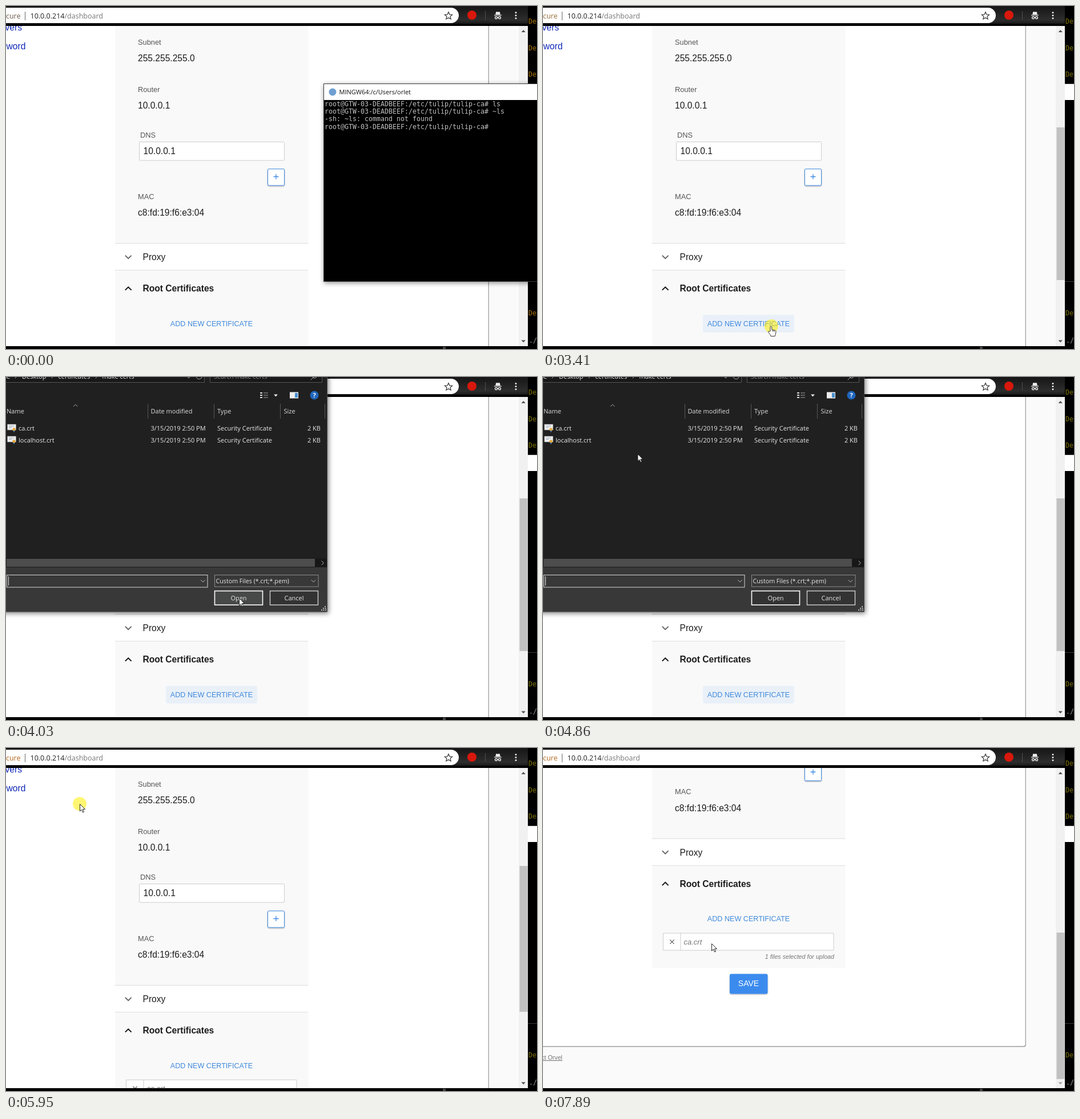
Animation, 930 px wide and 602 px high, one loop 8 s. Source, as an HTML page:

```html
<!DOCTYPE html>
<html lang="en">
<head>
<meta charset="utf-8">
<title>Adding a root certificate</title>
<style>
html, body { margin: 0; width: 100%; height: 100%; overflow: hidden; background: #000; }
svg { display: block; width: 930px; height: 602px; font-family: "Liberation Sans", Arial, sans-serif; }
text { white-space: pre; }
.ui { font-family: "Open Sans", "Noto Sans", sans-serif; }
.mono { font: 11.63px "DejaVu Sans Mono", monospace; }
.label { font-size: 12.8px; fill: #555; }
.value { font-size: 15.6px; fill: #1c1c1c; }
.link { font-size: 15.6px; fill: #1029b8; text-anchor: end; }
.line { fill: none; stroke-linecap: square; }

/* one shared 8 s clock: 1% = 80 ms */
.a { animation: 8s step-end infinite; }
.typed-l { animation-name: typedL; }
.typed-s { animation-name: typedS; }
.prompt { animation-name: prompt; }
.bar { animation-name: bar; }
.front { animation-name: front; }
.secure { animation-name: secure; }
.behind { animation-name: behind; }
.scroll { animation-name: scroll; }
.thumb { animation-name: thumb; }
.down { animation-name: down; }
.halo { animation-name: halo; }
.file { animation-name: file; }
.dialog { animation-name: dialog; transform-origin: 151px 174px; }
.open { animation-name: open; }
.caret { animation-name: caret; }
.row1 { animation-name: row1; }
.row2 { animation-name: row2; }
.pointer { animation-name: pointer; }
.move { animation-name: move; }
.arrow { animation-name: arrow; }
.hand { animation-name: hand; }
.ring { animation-name: ring; }

@keyframes typedL { 0% { opacity: 0 } 1%, 100% { opacity: 1 } }
@keyframes typedS { 0% { opacity: 0 } 2.25%, 100% { opacity: 1 } }
@keyframes prompt { 0% { opacity: 0 } 4.875%, 100% { opacity: 1 } }
@keyframes bar {
  0% { opacity: 0; transform: none }
  1% { opacity: 1; transform: translate(7px, 0) }
  2.25% { opacity: 1; transform: translate(14px, 0) }
  4.875% { opacity: 1; transform: translate(0, 13.4px) }
  11.625% { opacity: 0; transform: translate(0, 13.4px) }
  17.625% { opacity: 1; transform: translate(0, 13.4px) }
  23.25% { opacity: 0; transform: translate(0, 13.4px) }
  29.9375% { opacity: 1; transform: translate(0, 13.4px) }
  37.625%, 100% { opacity: 0; transform: translate(0, 13.4px) }
}
@keyframes front { 0% { opacity: 1 } 42.625%, 100% { opacity: 0 } }
@keyframes secure { 0% { fill: #6e5c4c } 42.625% { fill: #97703a } 74.375%, 100% { fill: #b4691c } }
@keyframes behind { 0% { fill: #a87408 } 42.625%, 100% { fill: #7e7408 } }
@keyframes scroll {
  0% { transform: none }
  87.875% { transform: translateY(-150px) }
  89%, 100% { transform: translateY(-257.5px) }
}
@keyframes thumb {
  0% { y: 213px; height: 268px }
  74.375% { y: 207px; height: 256px }
  87.875% { y: 275px; height: 256px }
  89%, 100% { y: 324px; height: 257px }
}
@keyframes down { 0% { fill: #505050 } 89%, 100% { fill: #a3a3a3 } }
@keyframes halo {
  0% { fill: #e9f0f9; opacity: 0 }
  29.9375% { fill: #e9f0f9; opacity: 1 }
  43.625% { fill: #e0ebf7; opacity: 1 }
  49.375% { fill: #e9f0f8; opacity: 1 }
  74.375%, 100% { fill: #e9f0f8; opacity: 0 }
}
@keyframes file { 0% { opacity: 0 } 74.375%, 100% { opacity: 1 } }
@keyframes dialog {
  0% { opacity: 0; transform: scale(.96) }
  47.625% { opacity: .2; transform: scale(.96) }
  48.625% { opacity: .57; transform: scale(.98) }
  49.375% { opacity: .85; transform: scale(.992) }
  50.375% { opacity: 1; transform: none }
  73.375% { opacity: .45; transform: scale(.975) }
  74.375%, 100% { opacity: 0; transform: scale(.96) }
}
@keyframes open { 0% { fill: #474949 } 53.375%, 100% { fill: #333 } }
@keyframes caret { 0% { opacity: 1 } 54.75% { opacity: 0 } 60.75% { opacity: 1 } 66.625%, 100% { opacity: 0 } }
@keyframes row1 { 0% { opacity: 0 } 61.75%, 100% { opacity: 1 } }
@keyframes row2 { 0% { opacity: 0 } 60.8% { opacity: 1 } 61.75%, 100% { opacity: 0 } }
@keyframes pointer { 0% { opacity: 0 } 23.25%, 100% { opacity: 1 } }
@keyframes move {
  0% { transform: translate(597px, 442px) }
  24.25% { transform: translate(587px, 474px) }
  26.1875% { transform: translate(587px, 474px); animation-timing-function: steps(3) }
  29% { transform: translate(455px, 586px); animation-timing-function: steps(2) }
  30.875% { transform: translate(400px, 562px) }
  44.625% { transform: translate(400px, 562px); animation-timing-function: steps(3) }
  47.625% { transform: translate(408px, 388px) }
  52.44% { transform: translate(408px, 388px); animation-timing-function: steps(5) }
  57.09% { transform: translate(220px, 190px); animation-timing-function: steps(5) }
  61.75% { transform: translate(129px, 98px) }
  79.875% { transform: translate(129px, 98px); animation-timing-function: steps(3) }
  83.25% { transform: translate(493px, 340px) }
  93.78% { transform: translate(493px, 340px); animation-timing-function: steps(3) }
  96.7% { transform: translate(385px, 382px); animation-timing-function: steps(2) }
  98.625%, 100% { transform: translate(295px, 343px) }
}
@keyframes arrow { 0% { opacity: 1 } 29.9375% { opacity: 0 } 45.625%, 100% { opacity: 1 } }
@keyframes hand { 0% { opacity: 0 } 29.9375% { opacity: 1 } 45.625%, 100% { opacity: 0 } }
@keyframes ring { 0% { opacity: 0 } 42.625% { opacity: .55 } 44.625% { opacity: 0 } 70.5% { opacity: .55 } 75.375%, 100% { opacity: 0 } }
</style>
</head>
<body>
<svg viewBox="0 0 930 602">
  <defs>
    <clipPath id="view"><rect y="35" width="914" height="562"/></clipPath>
    <linearGradient id="bar" x2="0" y2="1">
      <stop stop-color="#161616"/><stop offset=".8" stop-color="#2d2d2d"/><stop offset="1" stop-color="#1a1a1a"/>
    </linearGradient>
    <filter id="soft" x="-10%" y="-10%" width="120%" height="120%"><feGaussianBlur stdDeviation="4"/></filter>
    <filter id="lift" x="-20%" y="-20%" width="140%" height="150%"><feDropShadow dx="0" dy="1" stdDeviation="1" flood-opacity=".35"/></filter>
    <g id="cert">
      <path d="M2.500 0h15v10h-15z" fill="#eee" stroke="#999" stroke-width=".6"/>
      <path d="M5 3h9M5 5.500h5" stroke="#9ab" fill="none"/>
      <circle cx="14" cy="9" r="2.700" fill="#e4a93a"/>
      <path d="M13 11v3l1-1 1 1v-3z" fill="#4a7fc0"/>
    </g>
    <g id="term">
      <rect x="557" y="138" width="390" height="348" fill="#000" opacity=".45" filter="url(#soft)"/>
      <rect x="556.500" y="136.500" width="390" height="347" stroke="#3a3a3a"/>
      <rect x="557" y="137" width="390" height="28" fill="#fff"/>
      <circle cx="572" cy="151" r="6.500" fill="#6f9fd2"/>
      <text class="ui" x="583.500" y="155" font-size="11" fill="#111">MINGW64:/c/Users/orlet</text>
      <g class="mono" fill="#c0c0c0">
        <text x="558" y="176">root@GTW-03-DEADBEEF:/etc/tulip/tulip-ca# ls</text>
        <text x="558" y="189">root@GTW-03-DEADBEEF:/etc/tulip/tulip-ca# ~ls</text>
        <text x="558" y="202">-sh: ~ls: command not found</text>
        <text x="558" y="215.500">root@GTW-03-DEADBEEF:/etc/tulip/tulip-ca#</text>
        <text class="a typed-l" x="852" y="215.500">l</text>
        <text class="a typed-s" x="859" y="215.500">s</text>
        <text class="a prompt" x="558" y="229">root@GTW-03-DEADBEEF:/etc/tulip/tulip-ca#</text>
        <rect class="a bar" x="851" y="205.500" width="1" height="13"/>
      </g>
    </g>
  </defs>

  <rect width="930" height="602"/>
  <g class="mono a behind">
    <text x="915" y="31">De</text><text x="915" y="78">De</text>
    <text x="915" y="124">De</text><text x="915" y="543">De</text>
  </g>
  <text class="mono" x="916" y="591" fill="#999">./</text>
  <rect x="765" y="598" width="5" height="4" fill="#444"/>
  <use href="#term"/>

  <!-- browser window -->
  <g>
    <rect width="914" height="597"/>
    <rect width="914" height="31" fill="url(#bar)"/>
    <path d="M0 3h779.500a13.500 13.500 0 0 1 0 27H0z" fill="#fff"/>
    <g class="ui" font-size="12.500">
      <text class="a secure" x="25.500" y="21.500" text-anchor="end">Not secure</text>
      <path d="M33.500 10v15" stroke="#666"/>
      <text x="42.500" y="21.500" fill="#222">10.0.0.214<tspan fill="#777">/dashboard</tspan></text>
    </g>
    <path d="M775 10.500l1.900 4.300 4.700.5-3.500 3.100 1 4.600-4.100-2.400-4.100 2.400 1-4.600-3.500-3.100 4.700-.5z" fill="none" stroke="#444" stroke-width="1.300"/>
    <circle cx="816" cy="16" r="8" fill="#d8180c"/>
    <path d="M839.500 9v15" stroke="#505050"/>
    <g fill="#eee">
      <path d="M858 11l1-1 2.500.6 2.500-.6 1 1 .7 4h-8.400zM855 15.500h13v1.200h-13z"/>
      <g fill="none" stroke="#eee" stroke-width="1.300"><circle cx="858.500" cy="20.500" r="2"/><circle cx="864.500" cy="20.500" r="2"/><path d="M860.500 20h2"/></g>
      <circle cx="893" cy="11.500" r="1.500"/><circle cx="893" cy="16.500" r="1.500"/><circle cx="893" cy="21.500" r="1.500"/>
    </g>

    <g clip-path="url(#view)">
      <rect y="35" width="914" height="562" fill="#fafafa"/>
      <g class="a scroll">
        <path d="M-9-9H845.500V778q0 3.500-3.500 3.500H-9z" fill="#aaa" transform="translate(.5 .8)"/>
        <path d="M-9-9H844.500V777q0 3.500-3.500 3.500H-9z" fill="#fff"/>
        <text class="link" x="28" y="42.500">Servers</text>
        <text class="link" x="34.300" y="76">Password</text>
        <rect x="191" width="338.500" height="643.500" fill="#f9f9f9"/>
        <path d="M191 417h338.500v47H191z" fill="#fff"/>
        <path d="M191 416.500h338.500M191 463.700h338.500" stroke="#dcdcdc"/>

        <text class="label" x="231" y="67.500">Subnet</text>
        <text class="value" x="231" y="97">255.255.255.0</text>
        <text class="label" x="231" y="150.500">Router</text>
        <text class="value" x="231" y="180">10.0.0.1</text>
        <text class="label" x="235" y="230.500">DNS</text>
        <rect x="233.500" y="238.500" width="254" height="32.500" rx="1" fill="#fff" stroke="#ccc"/>
        <text class="value" x="240.500" y="260">10.0.0.1</text>
        <rect x="458.500" y="286" width="29" height="29" rx="2" fill="#fff" stroke="#3f8be6" filter="url(#lift)"/>
        <path d="M468.500 299.500h9M473 295v9" stroke="#3f8be6" stroke-width="1.300"/>
        <text class="label" x="231" y="338.500">MAC</text>
        <text class="value" x="231" y="368">c8:fd:19:f6:e3:04</text>

        <path class="line" d="M209.500 438.500l4.700 4.700 4.700-4.700" stroke="#666" stroke-width="1.900"/>
        <text class="value" x="239.500" y="446">Proxy</text>
        <path class="line" d="M209.500 498l4.700-4.700 4.700 4.700" stroke="#111" stroke-width="1.900"/>
        <text class="value" x="239.500" y="501" font-weight="bold">Root Certificates</text>
        <rect class="a halo" x="280" y="542" width="160" height="31" rx="3"/>
        <text x="360" y="561.500" font-size="12.600" fill="#3f89dc" text-anchor="middle">ADD NEW CERTIFICATE</text>

        <g class="a file">
          <path d="M210.500 582.500h298.500v30H210.500zM241 582.500v30" fill="#fff" stroke="#ccc"/>
          <path d="M222.300 594l7.400 7.400m0-7.400l-7.400 7.400" stroke="#666" stroke-width="1.200"/>
          <g font-style="italic" fill="#777">
            <text x="246.500" y="602" font-size="13">ca.crt</text>
            <text x="510" y="627.500" font-size="10.700" text-anchor="end">1 files selected for upload</text>
          </g>
        </g>
        <rect x="327" y="654" width="66.500" height="35" rx="3" fill="#3a8bee" filter="url(#lift)"/>
        <text x="360" y="675.700" font-size="14" fill="#fff" text-anchor="middle">SAVE</text>
        <text x="34" y="804.500" font-size="10.700" fill="#777" text-anchor="end" text-decoration="underline">Contact Orvel</text>
      </g>

      <rect x="898" y="35" width="16" height="562" fill="#f1f1f1"/>
      <rect class="a thumb" x="899.500" width="14" fill="#c1c1c1"/>
      <path d="M902.500 46l3.700-4 3.700 4z" fill="#505050"/>
      <path class="a down" d="M902.500 586.500l3.700 4 3.700-4z"/>
    </g>
  </g>

  <use class="a front" href="#term"/>

  <!-- file dialog -->
  <g class="a dialog ui" font-size="11" fill="#e8e8e8">
    <rect x="-260" y="-57" width="825" height="472" fill="#000" opacity=".5" filter="url(#soft)"/>
    <rect x="-261" y="-60" width="824" height="472" fill="#202020"/>
    <rect x="-261" y="334" width="824" height="78" fill="#383838"/>
    <path d="M562.500-60v472H-261" fill="none" stroke="#4a4a4a"/>

    <path d="M-200-20H347.500V9.500H-200zM357.500-20H553.500V9.500H357.500z" fill="#191919" stroke="#555"/>
    <text x="0" y="3">C</text><text x="28" y="3">Desktop</text>
    <text x="91.500" y="3">certificates</text><text x="168.500" y="3">make certs</text>
    <g class="line" stroke="#aaa">
      <path d="M16-3l2.500 2.500L16 2M80-3l2.500 2.500L80 2M157-3l2.500 2.500L157 2M316.500-1.500l3.500 3.500 3.500-3.500"/>
      <path d="M333-1.500a5.200 5.200 0 1 0 10.500 0M534 5l4-4"/>
      <circle cx="540.500" cy="-1.500" r="3.500"/>
    </g>
    <text x="364" y="3" fill="#8c8c8c">Search make certs</text>

    <path d="M445 28h4m-4 4h4m-4 4h4" stroke="#ddd" stroke-width="2"/>
    <path d="M451 28h8m-8 4h8m-8 4h8" stroke="#777" stroke-width="1.500"/>
    <path d="M469 30.500h7l-3.500 4z"/>
    <path d="M497 26.500h15v11h-15z" fill="#eee"/><path d="M506 28h5v8h-5z" fill="#4a90d0"/>
    <circle cx="540" cy="32" r="7.500" fill="#1f66bb"/>
    <text x="540" y="36" font-weight="bold" text-anchor="middle" fill="#fff">?</text>

    <path d="M248.500 47v26M364.500 47v26M480.500 47v26M558.500 47v26" stroke="#585858"/>
    <path class="line" d="M118.500 51.500l3.300-3.300 3.300 3.300" stroke="#aaa"/>
    <g fill="#ddd">
      <text x="1" y="64">Name</text><text x="253.500" y="64">Date modified</text>
      <text x="370" y="64">Type</text><text x="486.500" y="64">Size</text>
    </g>

    <rect class="a row1" x="-100" y="78.500" width="655" height="21.500" fill="#4d4d4d"/>
    <rect class="a row2" x="-100" y="100" width="655" height="21" fill="#4d4d4d"/>
    <use href="#cert" y="83"/><use href="#cert" y="104"/>
    <text x="22" y="94">ca.crt</text><text x="22" y="115">localhost.crt</text>
    <text x="253.500" y="94">3/15/2019 2:50 PM</text><text x="253.500" y="115">3/15/2019 2:50 PM</text>
    <text x="370" y="94">Security Certificate</text><text x="370" y="115">Security Certificate</text>
    <text x="551" y="94" text-anchor="end">2 KB</text><text x="551" y="115" text-anchor="end">2 KB</text>

    <rect x="-100" y="318.500" width="662" height="15" fill="#171717"/>
    <rect x="1" y="319" width="540" height="14" fill="#4d4d4d"/>
    <path class="line" d="M553 323l3.300 3.300-3.300 3.300M341.500 356.500l3.500 3.500 3.500-3.500M535 356.500l3.500 3.500 3.500-3.500" stroke="#bbb"/>
    <rect x="1.500" y="347.500" width="351.500" height="21.500" fill="none" stroke="#d8d8d8"/>
    <rect class="a caret" x="4" y="350" width="1" height="16"/>
    <rect x="365.500" y="347.500" width="181.500" height="20.500" fill="none" stroke="#8c8c8c"/>
    <text x="367.500" y="362" font-size="10.700">Custom Files (*.crt;*.pem)</text>
    <rect class="a open" x="365.500" y="375.500" width="84" height="24.500" stroke="#fff" stroke-width="1.600"/>
    <rect x="462.500" y="375.500" width="84" height="24.500" fill="#333" stroke="#c8c8c8" stroke-width="1.500"/>
    <text x="407.500" y="391.700" text-anchor="middle">Open</text>
    <text x="504.500" y="391.700" text-anchor="middle">Cancel</text>
    <path d="M558 403h2.500M555 406h6M552 409h9" stroke="#bbb" stroke-width="2" stroke-dasharray="2 1.500"/>
  </g>

  <!-- mouse -->
  <g class="a pointer">
    <g class="a move">
      <circle class="a ring" r="12" fill="#ffef00"/>
      <path class="a arrow" d="M.5.500v12.500l3-2.800 2 4.800 2-.9-2-4.700h4z" fill="#fff" stroke="#111" stroke-width=".9"/>
      <path class="a hand" d="M-2 9V1q1.400-2 2.800 0v5l6 1.400q1.300.5 1.200 2.200l-.8 5-1 2.900h-7.200l-1.200-2.800-3-4q-.7-2.300 1.300-1.700zM2.500 6.500v3M5 7v2.800" fill="#fff" stroke="#222" stroke-width=".9" stroke-linejoin="round"/>
    </g>
  </g>
</svg>
</body>
</html>
```
